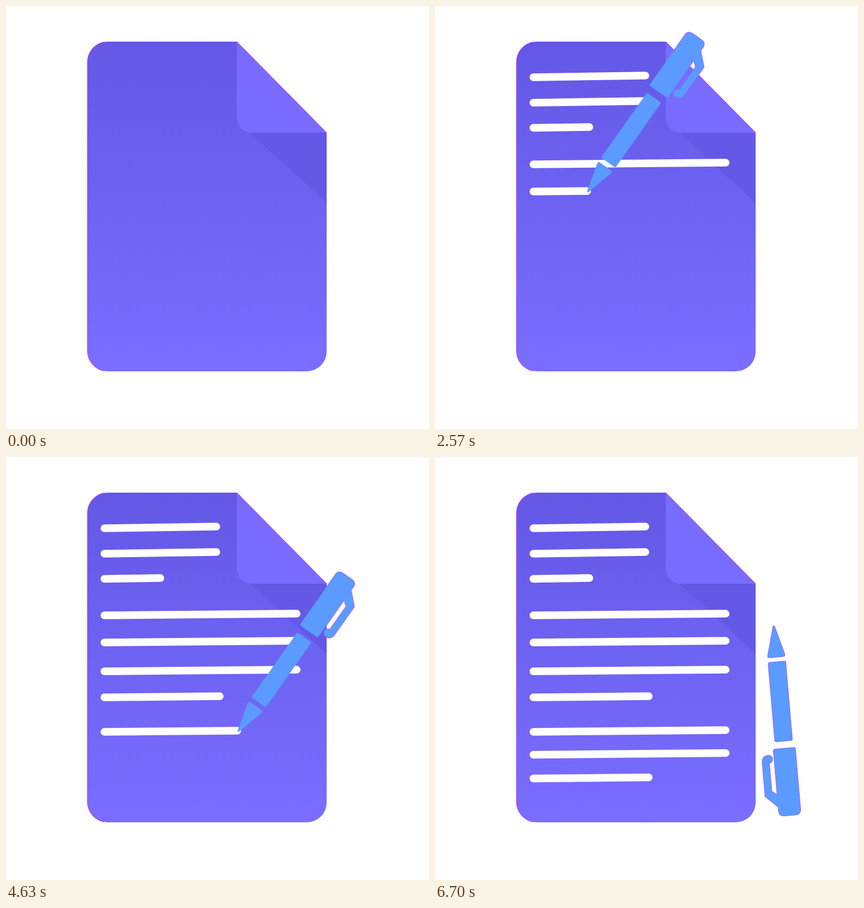
These frames come from a looping animation (748 by 748 pixels, 6.76 s). An HTML page:

```html
<!DOCTYPE html>
<html lang="en">
<head>
<meta charset="utf-8">
<title>Writing pen</title>
<style>
  html, body { margin: 0; width: 100%; height: 100%; overflow: hidden; background: #fff; }
  svg { display: block; width: 100%; height: 100%; }
  .edge { fill: none; stroke: #cf2cf6; stroke-width: 1; }
  #rows { stroke: #fff; stroke-width: 13.5; stroke-linecap: round; }
</style>
</head>
<body>
<svg viewBox="0 0 748 748">
  <defs>
    <linearGradient id="paper" gradientUnits="userSpaceOnUse" x1="0" y1="63" x2="0" y2="646">
      <stop offset="0" stop-color="#6458e6"/>
      <stop offset="0.12" stop-color="#665ae9"/>
      <stop offset="1" stop-color="#796eff"/>
    </linearGradient>
    <!-- Tip at the origin, body pointing up -->
    <g id="pen" stroke-linejoin="round">
      <path d="M-1.5 -2 L-15 -52 Q-16 -56 -12 -56 H12 Q16 -56 15 -52 L1.5 -2 Q0 1 -1.5 -2Z"/>
      <rect x="-15.5" y="-205" width="31" height="140.500" rx="3"/>
      <path d="M-16.500 -218 Q-19.500 -218 -19.500 -221 V-327 Q-19.500 -337 -9.500 -337 H9.500 Q19.500 -337 19.500 -327 V-221 Q19.500 -218 16.500 -218Z"/>
      <path d="M18 -322 L41 -300 V-241 Q41 -228 30 -228 A7 7 0 0 1 28.500 -242 V-292 L18 -300Z"/>
    </g>
  </defs>

  <use href="#pen" class="pen" fill="#5b9bff" stroke="#cf2cf6" stroke-width="1.2"/>

  <path fill="url(#paper)" d="M180 63 H408 L567 224 V611 A35 35 0 0 1 532 646 H180 A36 36 0 0 1 144 610 V99 A36 36 0 0 1 180 63Z"/>
  <path fill="#6458e6" d="M432 224 H567 V348Z"/>
  <path fill="#786cff" d="M408 63 L567 224 H434 A26 26 0 0 1 408 198Z"/>
  <path class="edge" d="M174 63.500 A36 36 0 0 0 144 99 V610 A36 36 0 0 0 174 645.500 M408 63 L567 224"/>

  <g id="rows"></g>
  <use href="#pen" class="pen" fill="#5b9bff"/>
</svg>
<script>
const LOOP = 6760, FRAME = 100 / 3, LEFT = 174;
const TILT = 35.2, REST = 175.1, HALF = 168;
const FLIP = 180, LAST = 201;

// Right end, left y, right y, start and end of the stroke in 1/30 s
const rows = [
  [372, 126, 123, 5, 15],
  [372, 171, 168, 20, 30],
  [273, 215.5, 214, 37, 46],
  [514, 280, 277, 57.4, 68.4],
  [514, 328, 325, 73.9, 85],
  [514, 379, 376, 97, 108],
  [378, 425, 423, 116, 126],
  [514, 486, 483, 131.4, 142.4],
  [514, 526.5, 523.5, 146, 157],
  [378, 568.5, 566.5, 162.2, 180]
].map(([x, y1, y2, from, to]) => ({ x, y1, y2, from, to }));

const group = document.getElementById('rows');
const pens = document.querySelectorAll('.pen');
for (const row of rows) {
  row.el = document.createElementNS('http://www.w3.org/2000/svg', 'line');
  row.el.setAttribute('x1', LEFT);
  row.el.setAttribute('y1', row.y1);
  group.append(row.el);
}

// Pen tip stops: enter, then both ends of every row
const stops = [[0, 190, -12]];
for (const r of rows) stops.push([r.from, LEFT, r.y1 + 2.5], [r.to, r.x + 1, r.y2 + 2.5]);

const mix = (a, b, p) => a + (b - a) * p;
const part = (n, a, b) => Math.min(1, Math.max(0, (n - a) / (b - a)));
const reach = deg => {
  const a = deg * Math.PI / 180;
  return [HALF * Math.sin(a), -HALF * Math.cos(a)];
};

function tipAt(n) {
  let i = 1;
  while (i < stops.length - 1 && stops[i][0] < n) i++;
  const a = stops[i - 1], b = stops[i], p = part(n, a[0], b[0]);
  return [mix(a[1], b[1], p), mix(a[2], b[2], p)];
}

// After the last row the pen turns about its middle
function pose(n) {
  const [x, y] = tipAt(n);
  const p = part(n, FLIP, LAST);
  const angle = mix(TILT, REST, p);
  const [sx, sy] = reach(TILT), [ex, ey] = reach(REST), [rx, ry] = reach(angle);
  return [mix(x + sx, 599 + ex, p) - rx, mix(y + sy, 298 + ey, p) - ry, angle];
}

function draw(now) {
  const n = Math.min(LAST, Math.floor((now % LOOP + 4) / FRAME));
  for (const r of rows) {
    const p = part(n, r.from, r.to);
    r.el.setAttribute('visibility', n >= r.from ? 'visible' : 'hidden');
    r.el.setAttribute('x2', mix(LEFT, r.x, p) + 0.01);
    r.el.setAttribute('y2', mix(r.y1, r.y2, p));
  }
  const [x, y, angle] = pose(n);
  for (const pen of pens) pen.setAttribute('transform', `translate(${x} ${y}) rotate(${angle})`);
}

const begin = performance.now();
function tick() {
  draw(performance.now() - begin);
  requestAnimationFrame(tick);
}
tick();
</script>
</body>
</html>
```
